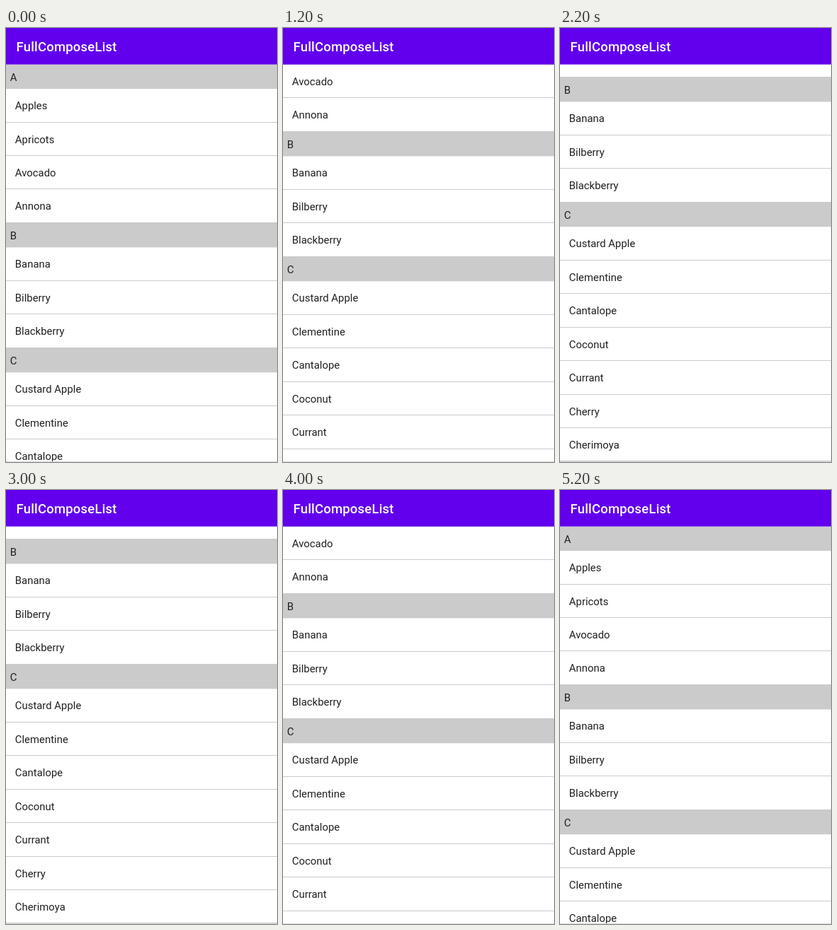
An HTML page with a canvas for the animation above (6000 ms loop, 383 by 614 pixels).

```html
<!DOCTYPE html>
<html lang="en">
<head>
<meta charset="utf-8">
<title>Fruit list</title>
<style>
  html, body { margin: 0; width: 100%; height: 100%; overflow: hidden; background: #fff; }
  canvas { display: block; }
</style>
</head>
<body>
<canvas id="stage" width="383" height="614"></canvas>
<script>
const ctx = document.getElementById('stage').getContext('2d');
const W = 383, H = 614, BAR = 51.6, HEADER = 34.5, ROW = 47.45;
const STEP = 200, LOOP = 6000, TURN = 2400, HOLD = 600;

const groups = {
  A: ['Apples', 'Apricots', 'Avocado', 'Annona'],
  B: ['Banana', 'Bilberry', 'Blackberry'],
  C: ['Custard Apple', 'Clementine', 'Cantalope', 'Coconut', 'Currant', 'Cherry', 'Cherimoya']
};

// Scroll position at each step of the way down: four swipes with short rests
const scroll = [0, 34, 77, 80.6, 97.5, 128, 129, 145, 178, 179.5, 191, 206, 225];

function rect(color, y, h) {
  ctx.fillStyle = color;
  ctx.fillRect(0, y, W, h);
}

function text(str, x, y, color = '#202020', font = '14.9px Roboto, sans-serif') {
  ctx.font = font;
  ctx.fillStyle = color;
  ctx.fillText(str, x, y);
}

function drawList(offset) {
  let y = BAR - offset;
  for (const [letter, fruits] of Object.entries(groups)) {
    rect('#cbcbcb', y, HEADER);
    text(letter, 5.8, y + 23.5);
    y += HEADER;
    for (const fruit of fruits) {
      text(fruit, 12.8, y + 29);
      y += ROW;
      rect('#cbcbcb', Math.round(y - 1), 1);
    }
  }
}

// Down to the last step, a rest, then the same steps back up
function stepAt(time) {
  if (time < TURN) return Math.floor(time / STEP);
  const back = Math.floor((time - TURN - HOLD) / STEP) + 1;
  const last = scroll.length - 1;
  return Math.max(0, last - Math.max(0, back));
}

function draw(time) {
  rect('#fff', 0, H);
  drawList(scroll[stepAt(time)]);
  rect('#dcdcdc', H - 1, 1);
  rect('#6200ee', 0, BAR);
  ctx.letterSpacing = '0.14px';
  text('FullComposeList', 14.5, 33.4, '#fff', '500 18.6px Roboto, sans-serif');
  ctx.letterSpacing = '0px';
}

const start = performance.now();
function tick() {
  draw((performance.now() - start) % LOOP);
  requestAnimationFrame(tick);
}
tick();
</script>
</body>
</html>
```
